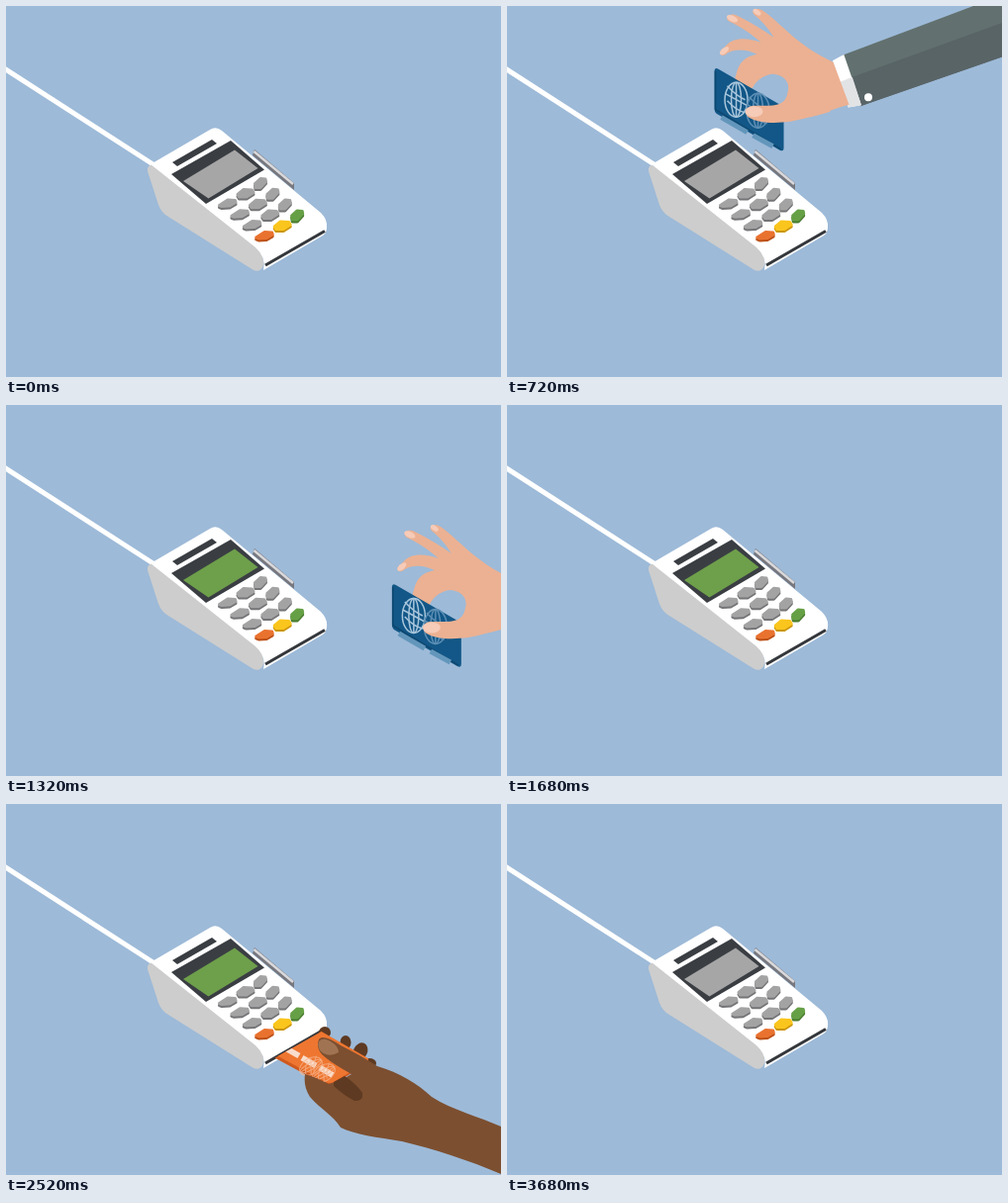
Animation of 500x375 px, one loop 3720 ms. Source, as an HTML page:

```html
<!DOCTYPE html>
<html lang="en">
<head>
<meta charset="utf-8">
<title>Card payment</title>
<style>
html, body { margin: 0; width: 100%; height: 100%; overflow: hidden; background: #9dbad8; }
svg { display: block; width: 500px; height: 375px; }
</style>
</head>
<body>
<svg viewBox="0 0 500 375">
  <defs>
    <clipPath id="outside"><path d="M63 375L500 127H900V700H63Z"/></clipPath>
    <g id="globe" fill="none" stroke-width="1.5">
      <ellipse rx="11.5" ry="17.5"/><ellipse rx="5" ry="17.5"/>
      <path d="M0-17V17M-11-6L11 6M-9-14Q0-4 9 0M-9 1Q0 11 9 13"/>
    </g>
  </defs>

  <path d="M-5 61L150 161" stroke="#fff" stroke-width="5"/>
  <circle id="ball" r="8.7" fill="#fff"/>

  <!-- swipe rail -->
  <path d="M249 151L251 145L291 179V186Z" fill="#77777d"/>
  <path d="M250.500 147L290 180" stroke="#d9d9dc" stroke-width="2.500"/>

  <g id="swipe">
    <g id="arm">
      <path d="M340 77L740-104V-33L362 127Z" fill="#62716f"/>
      <path d="M350 99L740-72V-33L362 127Z" fill="#596467"/>
      <path d="M331 83L342 76L363 126L350 129Z" fill="#fff"/>
      <path d="M340 104L352 98L363 126L350 129Z" fill="#e2e3e5"/>
      <circle cx="369.500" cy="117.500" r="4" fill="#fff"/>
    </g>
    <path fill="#ecb192" d="M333 83C318 76 306 68 296 60C284 50 272 38 262 31C256 27 249 31 253 35C262 42 268 50 273 58C262 50 250 43 236 36C229 32 222 38 228 42C240 47 252 56 260 63C246 58 232 58 225 66L219 72C217 76 222 78 226 74C234 69 246 70 256 75C245 77 238 82 235 95L232 106L250 112C254 102 262 96 272 95C284 96 290 104 287 114C285 124 278 128 270 128V143C285 143 300 140 314 137C328 133 340 128 349 126Z"/>
    <g fill="#f6cbb8">
      <ellipse cx="256" cy="32.500" rx="4.500" ry="2.500" transform="rotate(35 256 32.500)"/>
      <ellipse cx="231" cy="39" rx="6" ry="3" transform="rotate(25 231 39)"/>
      <ellipse cx="223" cy="71.500" rx="5.500" ry="2.800" transform="rotate(-40 223 71.500)"/>
    </g>
    <path d="M213 92Q213 88 217 90L281 127Q283 128 283 131V170Q283 174 279 172L215 135Q213 133 213 130Z" fill="#125787"/>
    <path d="M214 92V131L280 171" fill="none" stroke="#0d4770" stroke-width="1.500"/>
    <use href="#globe" x="235" y="121" stroke="#a9c6dc"/>
    <use href="#globe" x="257" y="132" stroke="#5d8fb5"/>
    <path d="M220 139L246 154M252 157L272 168" stroke="#6396bb" stroke-width="5"/>
    <path fill="#ecb192" d="M287.500 112C287 122 280 127 268 127H252C243 128 243 136 248 139C258 145 275 145 290 143C305 140 320 136 330 133L320 100Z"/>
    <ellipse cx="253" cy="133" rx="9" ry="5.500" fill="#f6cbb8"/>
  </g>

  <!-- terminal -->
  <path d="M143 167Q142 160 150 160L240 231Q262 248 260 262Q257 270 250 267L164 213Q157 209 154 201Z" fill="#cdcdcd"/>
  <path d="M146 160L206 125Q212 121 218 126L318 209Q325 216 324 224Q324 229 320 232L260 267Q263 254 252 244Z" fill="#fff"/>
  <path d="M262 262L322 227.500" stroke="#34373b" stroke-width="3"/>
  <path d="M168 158L208 135L213 139L173 162Z" fill="#3a3e43"/>
  <path d="M167 170L227 136L261 165.500L202 200Z" fill="#3a3e43"/>
  <path id="screen" d="M179 177L231 145.500L254.500 164L204.500 194.500Z"/>
  <g id="keys" stroke-width="3" stroke-linejoin="round"></g>

  <g id="insert">
    <g fill="#5e3a22">
      <circle cx="322" cy="231" r="6"/>
      <ellipse cx="343" cy="241" rx="5.500" ry="7"/>
      <ellipse cx="358" cy="250" rx="7" ry="9" transform="rotate(25 358 250)"/>
      <ellipse cx="367" cy="262" rx="7" ry="5"/>
    </g>
  </g>
  <g clip-path="url(#outside)">
    <g id="chipcard">
      <path d="M260 246V249Q260 251 263 252L322 284Q327 286 331 283L366 262V258Z" fill="#d0591d"/>
      <path d="M262 244L295 221Q299 219 303 221L364 256Q368 258 364 261L331 281Q327 283 323 281L262 248Q259 246 262 244Z" fill="#ee7630"/>
      <path d="M281 235L288 230.500L298 236L291 241Z" fill="#f0c51c"/>
      <path d="M284 233L295 239M288 238L294 233.500" stroke="#b58c16"/>
      <ellipse cx="305" cy="229.500" rx="7" ry="5.500" fill="#fbe9df"/>
      <path d="M270 240L296 254.500M299 256.500L313 264.500M317 266.500L330 274" stroke="#f9dccb" stroke-width="6"/>
      <g stroke="#f7b68f" opacity=".75">
        <use href="#globe" transform="translate(308 265) rotate(60) scale(.7)"/>
        <use href="#globe" transform="translate(321 272) rotate(60) scale(.7)"/>
      </g>
    </g>
  </g>
  <g id="grip">
    <path fill="#7c4f30" d="M316 238C320 233 330 239 338 244C350 250 363 257 375 265C398 272 415 282 430 296C450 309 480 317 500 326L760 428V480L500 374C470 361 430 348 400 341C375 337 352 334 338 327C330 314 318 309 307 296C302 288 301 281 302 273Q312 276 326 283Q338 280 349 273C337 266 326 260 319 253Q313 246 316 238Z"/>
    <path fill="#5e3a22" d="M331 281L342 275Q354 283 360 292Q361 301 352 300Q342 295 331 285Z"/>
    <path fill="#a07453" d="M316 240Q320 235 328 240Q336 245 336 251Q326 257 318 250Q314 245 316 240Z"/>
  </g>
</svg>
<script>
const LOOP = 3720;
const $ = id => document.getElementById(id);

const keyShapes = [
  'M-8.500 2L0-3.500L7.500-3L8-1L2 2.500L-6 3Z',
  'M-8 1L-2-4L6.500-3.500L8-1L1 3.500L-6.500 3.500Z',
  'M-5.500 0L0-5L5-4.500L5.500-2L0 4L-5 4Z'
];
const lastRow = [['#e9722f', '#bb5017'], ['#fac51d', '#cb960b'], ['#66a046', '#487a2e']];
let keys = '';
for (let row = 0; row < 4; row++) {
  keyShapes.forEach((d, col) => {
    const x = 224 + row * 12.400 + [0, 18, 33][col];
    const y = 200 + row * 10.800 + [0, -10, -20][col];
    const [top, side] = row < 3 ? ['#a3a3a4', '#747477'] : lastRow[col];
    const draw = (c, dy) => `<path d="${d}" fill="${c}" stroke="${c}" transform="translate(${x} ${y + dy})"/>`;
    keys += draw(side, 1.500) + draw(top, -0.500);
  });
}
$('keys').innerHTML = keys;

// rows: time, values...
const swipePath = [
  [160, 515, -25, 26], [480, 313, 7, 24], [600, 253, 20, 15], [800, 197, 81, 0],
  [900, 198, 81.500, 0], [1000, 213, 89, 0], [1160, 240, 104, 0],
  [1320, 389, 181, 0], [1500, 530, 155, 0]
];
const insertPath = [
  [1880, 250, 110], [2040, 169, 72], [2280, 50, 29], [2440, 0, 0],
  [3120, 0, 0], [3280, 50, 29], [3520, 250, 110]
];
const ballPath = [[1880, 160], [1920, 143], [2040, 88], [2200, 4], [2250, -20]];

// monotone cubic through the rows
function at(rows, t) {
  const last = rows.length - 1;
  if (t <= rows[0][0]) return rows[0].slice(1);
  if (t >= rows[last][0]) return rows[last].slice(1);
  const i = rows.findIndex(r => r[0] > t) - 1;
  const a = rows[i], b = rows[i + 1], h = b[0] - a[0], u = (t - a[0]) / h;
  return a.slice(1).map((p, k) => {
    const c = k + 1;
    const rate = j => (rows[j + 1][c] - rows[j][c]) / (rows[j + 1][0] - rows[j][0]);
    const slope = j => {
      if (j === 0) return rate(0);
      if (j === last) return rate(last - 1);
      const m = rate(j - 1), n = rate(j);
      return m * n > 0 ? 2 * m * n / (m + n) : 0;
    };
    const q = b[c], v = 1 - u;
    return p * v * v * (1 + 2 * u) + q * u * u * (3 - 2 * u)
      + h * u * v * (slope(i) * v - slope(i + 1) * u);
  });
}

function render(t) {
  const [x, y, turn] = at(swipePath, t);
  $('swipe').setAttribute('transform', `translate(${x - 213} ${y - 89})`);
  $('arm').setAttribute('transform', `rotate(${turn} 353 102)`);

  const [dx, dy] = at(insertPath, t);
  for (const id of ['insert', 'chipcard', 'grip'])
    $(id).setAttribute('transform', `translate(${dx} ${dy})`);

  const [bx] = at(ballPath, t > 2600 ? t - 1200 : t);
  $('ball').setAttribute('cx', bx);
  $('ball').setAttribute('cy', 64 + bx * 0.645);

  const paid = (t >= 1280 && t < 1960) || (t >= 2480 && t < 3160);
  $('screen').setAttribute('fill', paid ? '#6e9f4b' : '#a6a6a6');
}

const start = performance.now();
function tick() {
  render((performance.now() - start) % LOOP);
  requestAnimationFrame(tick);
}
tick();
</script>
</body>
</html>
```
